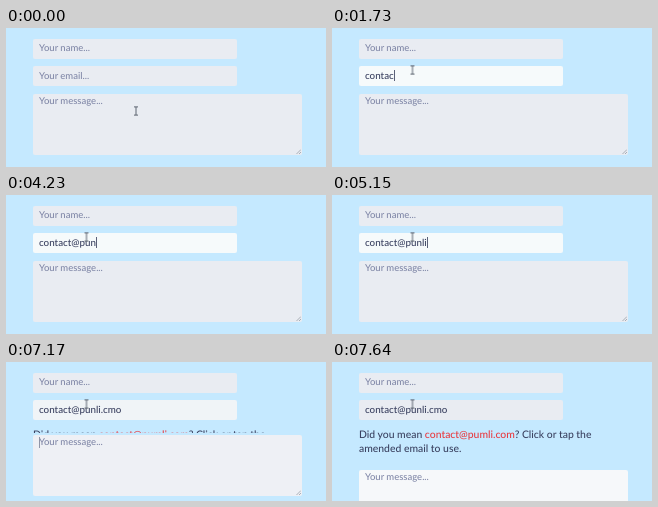
Write an HTML page that moves like this. It is 320 by 139 pixels and loops after 8000 ms.

```html
<!DOCTYPE html>
<html lang="en">
<head>
<meta charset="utf-8">
<title>Contact form</title>
<style>
  html, body {
    margin: 0;
    width: 100%;
    height: 100%;
    overflow: hidden;
    background: #c5e9ff;
  }
  .stage {
    position: relative;
    width: 320px;
    height: 139px;
    overflow: hidden;
    background: #c5e9ff;
    color: #3a4160;
    font: 500 9.8px/14px Lato, "Open Sans", sans-serif;
    text-rendering: geometricPrecision;
  }
  .field {
    position: absolute;
    left: 27px;
    width: 204px;
    height: 20px;
    box-sizing: border-box;
    padding-left: 6px;
    border-radius: 2px;
    background: #e9ecf2;
    line-height: 20px;
    white-space: pre;
  }
  .name { top: 11px; }
  .email { top: 38px; animation: email 8s linear infinite; }
  .ph { color: #8188a8; font-size: 9.5px; }
  .caret {
    display: inline-block;
    width: 1px;
    height: 11px;
    margin-right: -1px;
    vertical-align: -2px;
    background: #5a6078;
  }
  .flow { position: absolute; left: 27px; top: 66px; width: 269px; }
  .hint {
    height: 0;
    overflow: hidden;
    font-size: 10.4px;
    white-space: nowrap;
    animation: slide 8s infinite;
  }
  .hint b { color: #e83a40; font-weight: 500; }
  .flow .message {
    position: relative;
    left: 0;
    width: 269px;
    height: 61px;
    line-height: 14px;
    animation: message 8s linear infinite;
  }
  .message .caret {
    position: absolute;
    left: 6px;
    top: 2px;
    background: #9095a8;
    opacity: 0;
    animation: blink 8s step-end infinite;
  }
  .grip { position: absolute; right: 1px; bottom: 1px; }
  .pointer {
    position: absolute;
    left: 0;
    top: 0;
    animation: move 8s infinite;
  }
  svg { fill: none; }

  @keyframes move {
    0%, 0.6% {
      transform: translate(127px, 78px);
      animation-timing-function: cubic-bezier(.4, 0, .4, 1);
    }
    9%, 100% { transform: translate(77.5px, 37px); }
  }
  @keyframes email {
    0%, 8.8% { background: #e9ecf2; }
    11%, 88.3% { background: #f6fafb; }
    91.2%, 100% { background: #e9ecf2; }
  }
  @keyframes message {
    0%, 88.3% { background: #e9ecf2; }
    92%, 100% { background: #f6f8fa; }
  }
  @keyframes slide {
    0%, 88.275% {
      height: 0;
      margin-bottom: 0;
      animation-timing-function: cubic-bezier(.37, 0, .63, 1);
    }
    93.275%, 100% { height: 29px; margin-bottom: 13px; }
  }
  @keyframes blink {
    0% { opacity: 0; }
    88.5% { opacity: 1; }
    95.2%, 100% { opacity: 0; }
  }
</style>
</head>
<body>
<div class="stage">
  <div class="field name ph">Your name...</div>
  <div class="field email"><span id="typed"></span><i class="caret" id="caret"></i><span class="ph" id="empty">Your email...</span></div>
  <div class="flow">
    <div class="hint">Did you mean <b>contact@pumli.com</b>? Click or tap the<br>amended email to use.</div>
    <div class="field message"><span class="ph">Your message...</span><i class="caret"></i>
      <svg class="grip" width="5" height="5" stroke="#8d929d" stroke-width=".7"><path d="M.5 5L5 .5M3 5L5 3"/></svg>
    </div>
  </div>
  <svg class="pointer" width="6" height="10" stroke="#5d6470" stroke-width="1"><path d="M1 .9H5M3 1V9M1 9.1H5"/></svg>
</div>
<script>
  const LOOP = 8000;
  const address = 'contact@punli.cmo';
  // Time of each key press, in ms
  const keys = [1170, 1270, 1400, 1500, 1620, 1730, 1880, 2810,
    3510, 3830, 4130, 4690, 5070, 5700, 5850, 6400, 6480];
  // Spans in which the email caret is lit
  const lit = [[870, 2430], [2810, 3280], [3510, 4610], [4690, 5530],
    [5700, 6170], [6400, 6710]];
  const [typed, caret, empty] =
    ['typed', 'caret', 'empty'].map(id => document.getElementById(id));
  let start;

  function draw(now) {
    start ??= now;
    const t = (now - start) % LOOP;
    const count = keys.filter(k => k <= t).length;
    const on = lit.some(([a, b]) => t >= a && t < b);
    typed.textContent = address.slice(0, count);
    empty.style.display = count ? 'none' : '';
    caret.style.opacity = on ? 1 : 0;
    requestAnimationFrame(draw);
  }
  requestAnimationFrame(draw);
</script>
</body>
</html>
```
